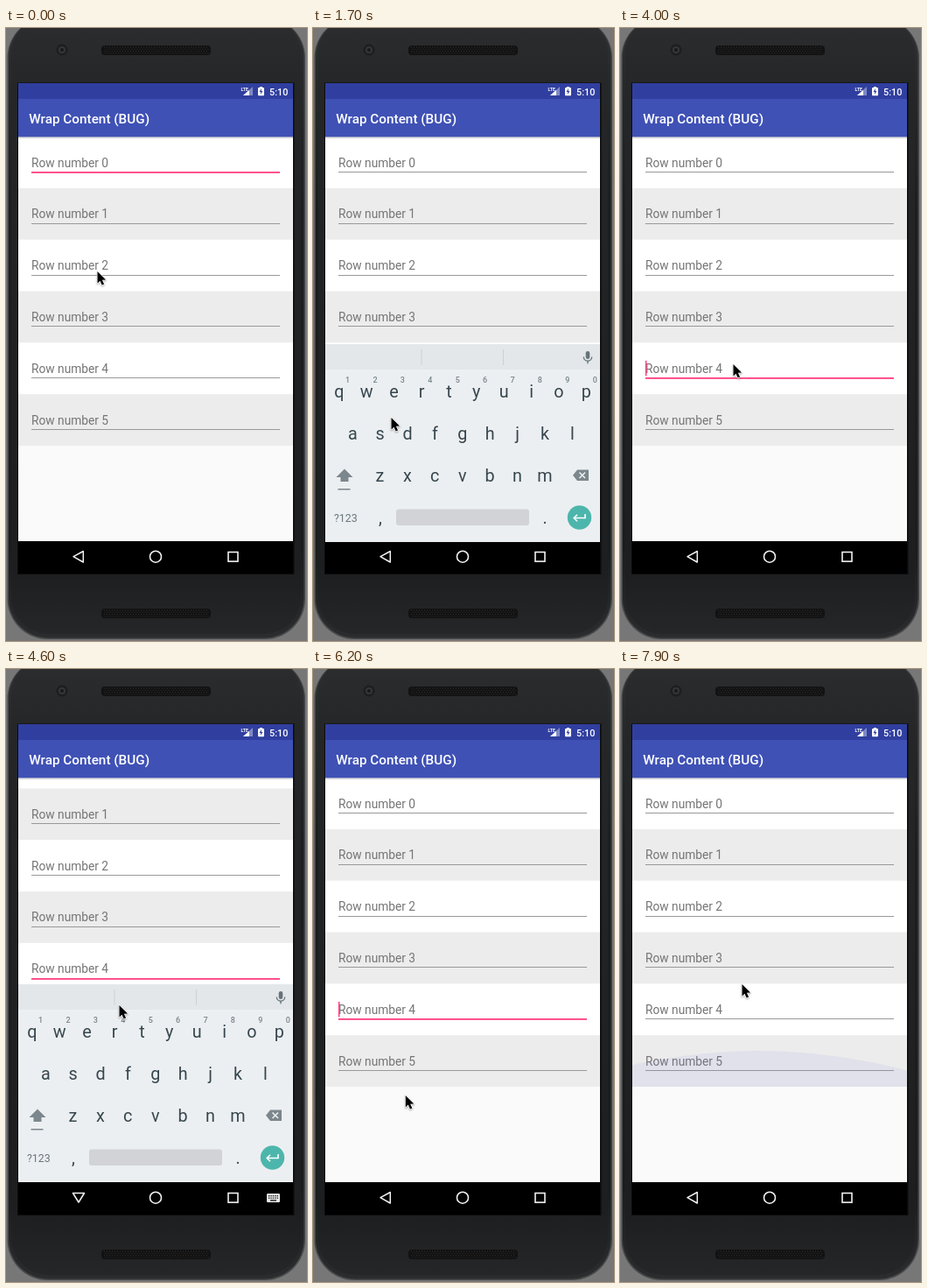
Recreate the animation shown at these times as an HTML page with a canvas. Size 344 px wide and 700 px high, loop 8 s.

```html
<!DOCTYPE html>
<html lang="en">
<head>
<meta charset="utf-8">
<title>Wrap Content</title>
<style>
html, body { margin: 0; width: 100%; height: 100%; overflow: hidden; background: #777; }
canvas { display: block; width: 344px; height: 700px; }
</style>
</head>
<body>
<canvas id="stage"></canvas>
<script>
const W = 344, H = 700, LOOP = 8000, STEP = 100;
const PINK = '#ff4081', ROW_H = 58.8, LIST_TOP = 124.2;
const canvas = document.getElementById('stage');
const c = canvas.getContext('2d');
const dpr = window.devicePixelRatio || 1;
canvas.width = W * dpr;
canvas.height = H * dpr;

// time, x, y of the pointer
const POINTER = [
  [0, 104.5, 278], [700, 90, 442], [1000, 90, 442], [1100, 89.5, 445],
  [3300, 89.5, 445], [3700, 129.5, 384], [4700, 129.5, 384], [5300, 86.5, 598],
  [5600, 86.5, 598], [6500, 112.5, 448], [7500, 112.5, 448], [7900, 139.5, 360]
];
// start, end, row, blink phase start
const FOCUS = [
  [0, 1000, 0, -800], [1000, 1600, 5, 1000], [2800, 2990, 5, 2800],
  [3900, 6600, 4, 3900], [6600, 6990, 5, 6600]
];
// show start, show length, hide start
const KEYBOARD = [[1400, 200, 1697], [2820, 150, 2997], [4120, 200, 5425], [6780, 200, 7000]];
const HIDE_MS = 175;

const clamp = v => Math.max(0, Math.min(1, v));
const during = (t, a, b) => t >= a && t < b;

function rect(x, y, w, h, fill) {
  c.fillStyle = fill;
  c.fillRect(x, y, w, h);
}

function roundRect(x, y, w, h, r, fill) {
  c.beginPath();
  c.roundRect(x, y, w, h, r);
  c.fillStyle = fill;
  c.fill();
}

function disc(x, y, r, fill) {
  c.beginPath();
  c.arc(x, y, r, 0, Math.PI * 2);
  c.fillStyle = fill;
  c.fill();
}

function path(points, close = true) {
  c.beginPath();
  points.forEach(([x, y]) => c.lineTo(x, y));
  if (close) c.closePath();
}

function poly(points, fill) {
  path(points);
  c.fillStyle = fill;
  c.fill();
}

function line(points, color, width, close = false) {
  path(points, close);
  c.strokeStyle = color;
  c.lineWidth = width;
  c.stroke();
}

function text(s, x, y, size, color, weight = 400, align = 'left') {
  c.font = `${weight} ${size}px Roboto, sans-serif`;
  c.textAlign = align;
  c.fillStyle = color;
  c.fillText(s, x, y);
}

function vertical(y0, y1, stops) {
  const g = c.createLinearGradient(0, y0, 0, y1);
  stops.forEach(([p, color]) => g.addColorStop(p, color));
  return g;
}

function speaker(y) {
  roundRect(109, y, 125, 11, 4, '#121213');
  for (let row = 0; row < 4; row++)
    for (let x = 112; x < 232; x += 3)
      rect(x + (row % 2) * 1.5, y + 1.5 + row * 2.3, 1, 1, '#303031');
}

function drawPhone() {
  rect(0, 0, W, H, '#777');
  roundRect(1.5, -12, 340.5, 710, 46, '#48494a');
  roundRect(3, -12, 337.5, 708.5, 45,
    vertical(0, H, [[0, '#2f3031'], [.09, '#272829'], [.3, '#1c1d1e'], [.85, '#1b1c1d'], [1, '#2c2d2e']]));
  roundRect(6, -12, 331, 704, 42,
    vertical(0, H, [[0, '#2b2c2d'], [.1, '#252627'], [.88, '#1d1e1f'], [1, '#262728']]));
  speaker(20);
  speaker(663);
  disc(64, 25, 6.5, '#1d1e1f');
  disc(64, 25, 4, '#343638');
  disc(64, 25, 2, '#17191b');
  rect(13, 62.5, 316.5, 561.5, '#0b0b0c');
}

function drawBars() {
  rect(14, 124, 314, 3, vertical(124, 127, [[0, 'rgba(0,0,0,.24)'], [1, 'rgba(0,0,0,0)']]));
  rect(14, 63, 314, 18.5, '#303f9f');
  rect(14, 81, 314, 43.3, '#3f51b5');
  text('Wrap Content (BUG)', 26.2, 108.8, 15.3, '#fff', 500);
  text('5:10', 322.3, 76.5, 10.8, '#fff', 500, 'right');
  text('LTE', 268.5, 71.5, 5.2, '#fff', 700);
  poly([[282, 67], [282, 77], [271, 77]], '#7f89c5');
  poly([[278, 71], [278, 77], [271, 77]], '#fff');
  roundRect(288, 68, 7, 9.3, .8, '#fff');
  rect(290, 67, 3, 1.2, '#fff');
  poly([[292, 69], [289.5, 73], [291.2, 73], [290.8, 76], [293.5, 72], [291.8, 72]], '#303f9f');
}

function drawRow(i, y, focus, t) {
  if (i >= 0 && i < 6) {
    rect(14, y, 314, ROW_H, i % 2 ? '#ececec' : '#fff');
    text('Row number ' + i, 29, y + 34.3, 13.75, '#757575');
    const focused = focus && focus[2] === i;
    if (focused) rect(29, Math.round(y + 39.6), 284, 1.8, PINK);
    else rect(29, Math.round(y + 39.8), 284, 1, '#999');
    if (focused && (t - focus[3]) % 1000 < 500) rect(29, y + 20.5, 1.5, 17.5, PINK);
  }
}

function drawList(t) {
  const focus = FOCUS.find(f => during(t, f[0], f[1]));
  const scroll = during(t, 4300, 5400) ? 46.5 : 0;
  c.save();
  c.beginPath();
  c.rect(14, 124, 314, 462);
  c.clip();
  rect(14, 124, 314, 462, '#fafafa');
  for (let i = 0; i < 6; i++) drawRow(i, LIST_TOP + i * ROW_H - scroll, focus, t);
  if (t >= 7200) {
    c.beginPath();
    c.rect(14, LIST_TOP + 5 * ROW_H, 314, ROW_H);
    c.clip();
    disc(158, 1086, 650, 'rgba(100,110,210,.09)');
  }
  c.restore();
}

function keyboardState(t) {
  const k = KEYBOARD.find(([show, , hide]) => during(t, show, hide + HIDE_MS));
  if (!k) return null;
  if (t < k[2]) {
    const left = 1 - clamp((t - k[0]) / k[1]);
    return { dy: 24 * left * left, alpha: 1 - left };
  }
  const left = 1 - (t - k[2]) / HIDE_MS;
  // The window starts to slide by a whole pixel.
  return { dy: Math.ceil(24 * (1 - left * left)), alpha: left > .97 ? 1 : left };
}

function drawKeys(letters, x, y) {
  [...letters].forEach((ch, i) => text(ch, x + i * 31.4, y, 19.8, '#37474f', 400, 'center'));
}

function drawKeyboardFace() {
  const gray = '#7b878c';
  rect(14, 360, 314, 226, '#eceff1');
  rect(14, 360, 314, 30, '#e4e7e9');
  rect(14, 389.5, 314, 1, '#f3f5f6');
  rect(123.5, 366, 1, 18, '#cdd1d4');
  rect(217, 366, 1, 18, '#cdd1d4');

  // microphone
  roundRect(311.7, 368, 4.6, 9, 2.3, '#66747b');
  c.beginPath();
  c.arc(314, 374.5, 4.7, 0, Math.PI);
  c.strokeStyle = '#66747b';
  c.lineWidth = 1.3;
  c.stroke();
  rect(313.3, 379, 1.4, 3.3, '#66747b');

  drawKeys('qwertyuiop', 29.8, 420.5);
  [...'1234567890'].forEach((n, i) => text(n, 39.6 + i * 31.4, 404.2, 9, '#78858b', 500, 'center'));
  drawKeys('asdfghjkl', 45.3, 468.7);
  drawKeys('zxcvbnm', 76.5, 516.7);

  // shift
  poly([[36, 502.5], [45.5, 512], [40.5, 512], [40.5, 517], [31.5, 517], [31.5, 512], [26.5, 512]], gray);
  rect(28.5, 525, 14, 1.5, gray);
  // backspace
  poly([[297, 509.7], [302, 503.5], [315, 503.5], [315, 516], [302, 516]], gray);
  line([[304.5, 506.5], [311, 513]], '#eceff1', 1.6);
  line([[311, 506.5], [304.5, 513]], '#eceff1', 1.6);

  text('?123', 24, 562.5, 12.4, '#66747b');
  text(',', 77, 564.7, 19.8, '#37474f', 400, 'center');
  text('.', 265, 564.7, 19.8, '#37474f', 400, 'center');
  roundRect(95, 548.5, 152, 18.5, 3, '#d1d3d6');
  disc(304.5, 558, 13.7, '#4db6ac');
  line([[311, 554], [311, 558.5], [298.5, 558.5]], '#fff', 1.6);
  line([[302, 554.7], [298.2, 558.5], [302, 562.3]], '#fff', 1.6);
}

function drawKeyboard(t) {
  const k = keyboardState(t);
  if (!k) return;
  c.save();
  c.globalAlpha = k.alpha;
  c.translate(0, k.dy);
  drawKeyboardFace();
  c.restore();
}

function drawRipple(t) {
  if (!during(t, 5300, 5900)) return;
  const grow = clamp((t - 5200) / 300);
  const fade = 1 - clamp((t - 5500) / 400);
  const w = 82 * grow;
  roundRect(83 - w / 2, 586, w, 36, 18, `rgba(255,255,255,${.16 * fade})`);
}

function drawNavIcons(t) {
  const shown = during(t, 1500, 1690) || during(t, 4300, 5400) || during(t, 6900, 6990);
  c.lineJoin = 'round';
  if (shown) {
    line([[76.5, 598.5], [89.5, 598.5], [83, 609]], '#f2f2f2', 1.5, true);
    roundRect(298, 599, 15, 10, 1.2, '#e6e6e6');
    for (let y = 601; y < 605; y += 2.5)
      for (let x = 300; x < 311; x += 2.4) rect(x, y, 1.3, 1.3, '#111');
    rect(302, 606.2, 7, 1.3, '#111');
  } else {
    line([[77, 603.7], [88.3, 597.5], [88.3, 610]], '#f2f2f2', 1.5, true);
  }
  c.lineJoin = 'miter';
  c.beginPath();
  c.arc(171, 603.7, 6.5, 0, Math.PI * 2);
  c.lineWidth = 1.6;
  c.stroke();
  c.strokeRect(254, 598.5, 11, 10.6);
}

function drawPointer(t) {
  let i = POINTER.findIndex(p => p[0] > t);
  if (i < 0) i = POINTER.length;
  const a = POINTER[i - 1], b = POINTER[i] || a;
  const p = b === a ? 0 : (t - a[0]) / (b[0] - a[0]);
  const e = p * p * (3 - 2 * p);
  c.save();
  c.translate(a[1] + (b[1] - a[1]) * e, a[2] + (b[2] - a[2]) * e);
  const arrow = [[0, 0], [0, 13.5], [3, 10.7], [5.2, 15.6], [7.6, 14.5], [5.4, 9.8], [9.6, 9.6]];
  c.shadowColor = 'rgba(0,0,0,.35)';
  c.shadowBlur = 2 * dpr;
  c.shadowOffsetY = dpr;
  c.lineJoin = 'round';
  line(arrow, '#fff', 1.5, true);
  c.shadowColor = 'transparent';
  poly(arrow, '#000');
  c.restore();
}

function draw(t) {
  c.setTransform(dpr, 0, 0, dpr, 0, 0);
  drawPhone();
  drawList(t);
  drawBars();
  rect(14, 586, 314, 37, '#000');
  drawKeyboard(t);
  drawRipple(t);
  drawNavIcons(t);
  drawPointer(t);
}

const start = performance.now();
function tick() {
  const t = (performance.now() - start) % LOOP;
  draw(Math.floor(t / STEP) * STEP);
  requestAnimationFrame(tick);
}
tick();
</script>
</body>
</html>
```
